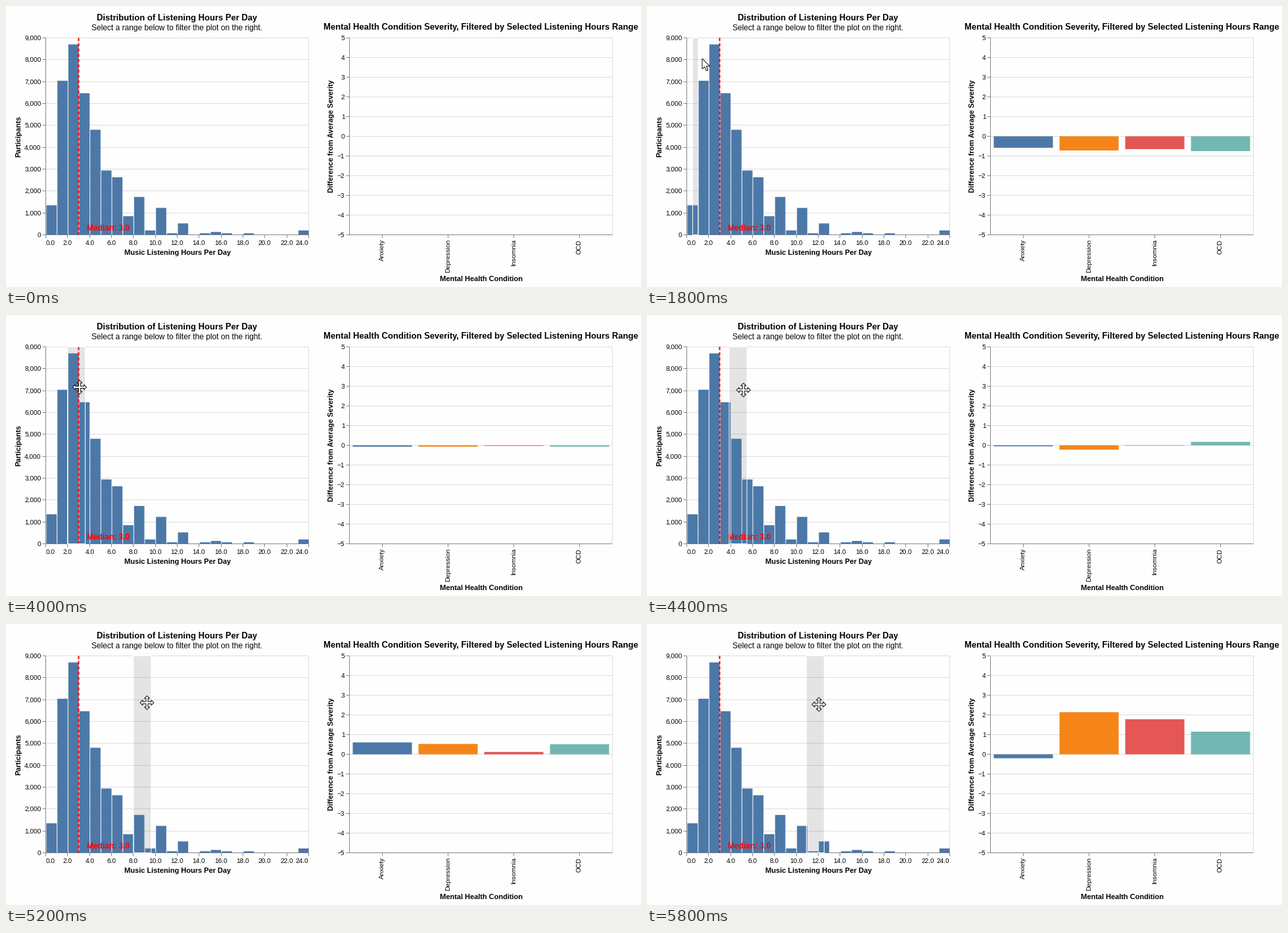
Write a matplotlib script that moves like this. It is 966 by 428 pixels and loops after 6 s.

```python
import numpy as np
import matplotlib.pyplot as plt
from matplotlib.animation import FuncAnimation
from matplotlib.patches import Polygon, Rectangle

W, H, DPI = 966, 428, 100
PX = 72 / DPI
STEP, FRAMES = 200, 30
BLUE, ORANGE, RED, TEAL = "#4c78a8", "#f58518", "#e45756", "#72b7b2"
GRID, AXIS = "#dddddd", "#888888"
LEFT, RIGHT, TOP, BOTTOM, SIZE = 60.5, 522.5, 48.5, 348.5, 400
HOUR = SIZE / 24
ZERO = (TOP + BOTTOM) / 2

plt.rcParams.update({"font.family": "Liberation Sans", "path.snap": False,
                     "text.hinting": "native"})
fig = plt.figure(figsize=(W / DPI, H / DPI), dpi=DPI, facecolor="#fefefe")
ax = fig.add_axes([0, 0, 1, 1])
ax.set_xlim(0, W)
ax.set_ylim(H, 0)
ax.axis("off")


def line(x0, y0, x1, y1, color, z=1, width=1, **kw):
    ax.plot([x0, x1], [y0, y1], color=color, lw=width * PX, zorder=z,
            solid_capstyle="butt", **kw)


def label(x, y, s, size=10, ha="center", bold=False, turn=0, color="black", z=5):
    ax.text(x, y, s, fontsize=size * PX, ha=ha, va="baseline", color=color,
            weight="bold" if bold else "normal", rotation=turn,
            rotation_mode="anchor", zorder=z)


def rect(x, y, w, h, z, **kw):
    return ax.add_patch(Rectangle((x, y), w, h, zorder=z, **kw))


def frame_axes(left, y_ticks, x_ticks):
    right = left + SIZE
    for y, text in y_ticks:
        line(left, y, right, y, GRID)
        line(left - 5, y, left, y, AXIS, 2)
        label(left - 7, y + 3.5, text, ha="right")
    for x in x_ticks:
        line(x, BOTTOM, x, BOTTOM + 5, AXIS, 2)
    line(right, TOP, right, BOTTOM, GRID)
    line(left, TOP, left, BOTTOM, AXIS, 2)
    line(left, BOTTOM, right, BOTTOM, AXIS, 2)


# Histogram
counts = [1350, 7040, 8700, 6470, 4800, 2940, 2630, 850, 1730, 200, 1230, 70, 520]
tail = {14: 70, 15: 130, 16: 70, 18: 70, 23: 200}

hour_ticks = [LEFT + round(2 * k * HOUR) for k in range(13)]
frame_axes(LEFT, [(BOTTOM - round(k * 100 / 3), f"{k * 1000:,}" if k else "0")
                  for k in range(10)], hour_ticks)
for k, x in enumerate(hour_ticks):
    label(x, 364, f"{2 * k}.0", ha={0: "left", 12: "right"}.get(k, "center"))
for k, n in [*enumerate(counts), *tail.items()]:
    rect(LEFT + 1 + k * HOUR, BOTTOM, HOUR - 1, -n / 30, 4, fc=BLUE, lw=0)

label(260, 22, "Distribution of Listening Hours Per Day", 13, bold=True)
label(260, 37, "Select a range below to filter the plot on the right.", 12)
label(260.5, 379, "Music Listening Hours Per Day", 11, bold=True)
label(22, ZERO, "Participants", 11, bold=True, turn=90)
median = LEFT + 3 * HOUR
line(median, TOP, median, BOTTOM, "red", 5, 2, ls=(0, (2.5, 1.5)),
     dash_capstyle="butt")
label(123, 342, "Median: 3.0", 12, ha="left", bold=True, color="red", z=6)

# Severity chart
names = ["Anxiety", "Depression", "Insomnia", "OCD"]
centers = [RIGHT + 50 + 100 * k for k in range(4)]
frame_axes(RIGHT, [(ZERO - 30 * v, str(v).replace("-", "\u2212"))
                   for v in range(-5, 6)], centers)
for x, name in zip(centers, names):
    label(x + 2.5, BOTTOM + 7, name, ha="right", turn=90)
label(722, 36, "Mental Health Condition Severity, Filtered by Selected "
      "Listening Hours Range", 13, bold=True)
label(722.5, 419, "Mental Health Condition", 11, bold=True)
label(498, ZERO, "Difference from Average Severity", 11, bold=True, turn=90)
bars = [rect(x - 45, ZERO, 90, 0, 4, fc=c, lw=0)
        for x, c in zip(centers, [BLUE, ORANGE, RED, TEAL])]

# Brush and pointers
shade = rect(0, TOP, 0, BOTTOM - TOP, 3, fc="#333333", alpha=.125, lw=0)
edge = rect(0, TOP, 0, BOTTOM - TOP, 7, fc="none", ec="white", lw=PX)

arrow_pts = np.array([(0, 0), (0, 16), (3.7, 12.6), (6.3, 18.6), (8.8, 17.5),
                      (6.3, 11.7), (11.5, 11.7)])
arm = np.array([(-1.5, -1.5), (-1.5, -6.5), (-4, -6.5), (0, -10.5), (4, -6.5),
                (1.5, -6.5)])
quarter = np.array([[0, 1], [-1, 0]])
move_pts = np.vstack([arm @ np.linalg.matrix_power(quarter, k) for k in range(4)])


def pointer(pts):
    return ax.add_patch(Polygon(pts, fc="white", ec="#111111", lw=PX, zorder=9))


arrow, move = pointer(arrow_pts), pointer(move_pts)

# Mean selected hour -> severity offset per condition
severity = {1: (-.58, -.72, -.65, -.75), 1.5: (-.32, -.4, -.5, -.26),
            2.5: (-.07, -.07, -.03, -.07), 6.5: (-.03, -.37, -.01, .42),
            10: (1.08, 1.2, .22, .58), 11.5: (-.2, 2.14, 1.78, 1.15)}

# Sliding the brush: time, brush left, pointer x, pointer y
slide = [(3400, 69.5, 89.5, 94.5), (4000, 93.5, 112, 110),
         (4800, 156.5, 181.5, 118.5), (5400, 212.5, 231, 120.5),
         (5800, 242.5, 261.5, 122.5)]


def at(x, xs, rows):
    return np.array([np.interp(x, xs, row) for row in rows])


def offsets(lo, hi):
    """Only whole hours inside the brush count, so the bars jump."""
    first, last = np.ceil((lo - LEFT) / HOUR), np.floor((hi - LEFT) / HOUR)
    if last < first:
        return np.zeros(4)
    return at((first + last) / 2, list(severity), zip(*severity.values()))


def draw(i):
    t = i * STEP
    times, *rows = zip(*slide)
    lo, *grip = at(t, times, rows)
    width = np.interp(t, [800, 1300, 1800, 2200], [0, 8, 8.5, 27])
    hi = lo + width
    for r in (shade, edge):
        r.set_visible(width > 0)
        r.set_x(lo)
        r.set_width(width)
    for bar, v in zip(bars, offsets(lo, hi)):
        bar.set_height(-30 * v)
    arrow.set_xy(arrow_pts + (hi + 6, 80))
    move.set_xy(move_pts + grip)
    arrow.set_visible(400 <= t < 2400)
    move.set_visible(t >= 2400)
    return [shade, edge, arrow, move, *bars]


anim = FuncAnimation(fig, draw, frames=FRAMES, interval=STEP, repeat=True,
                     repeat_delay=0, blit=False)
plt.show()
```
